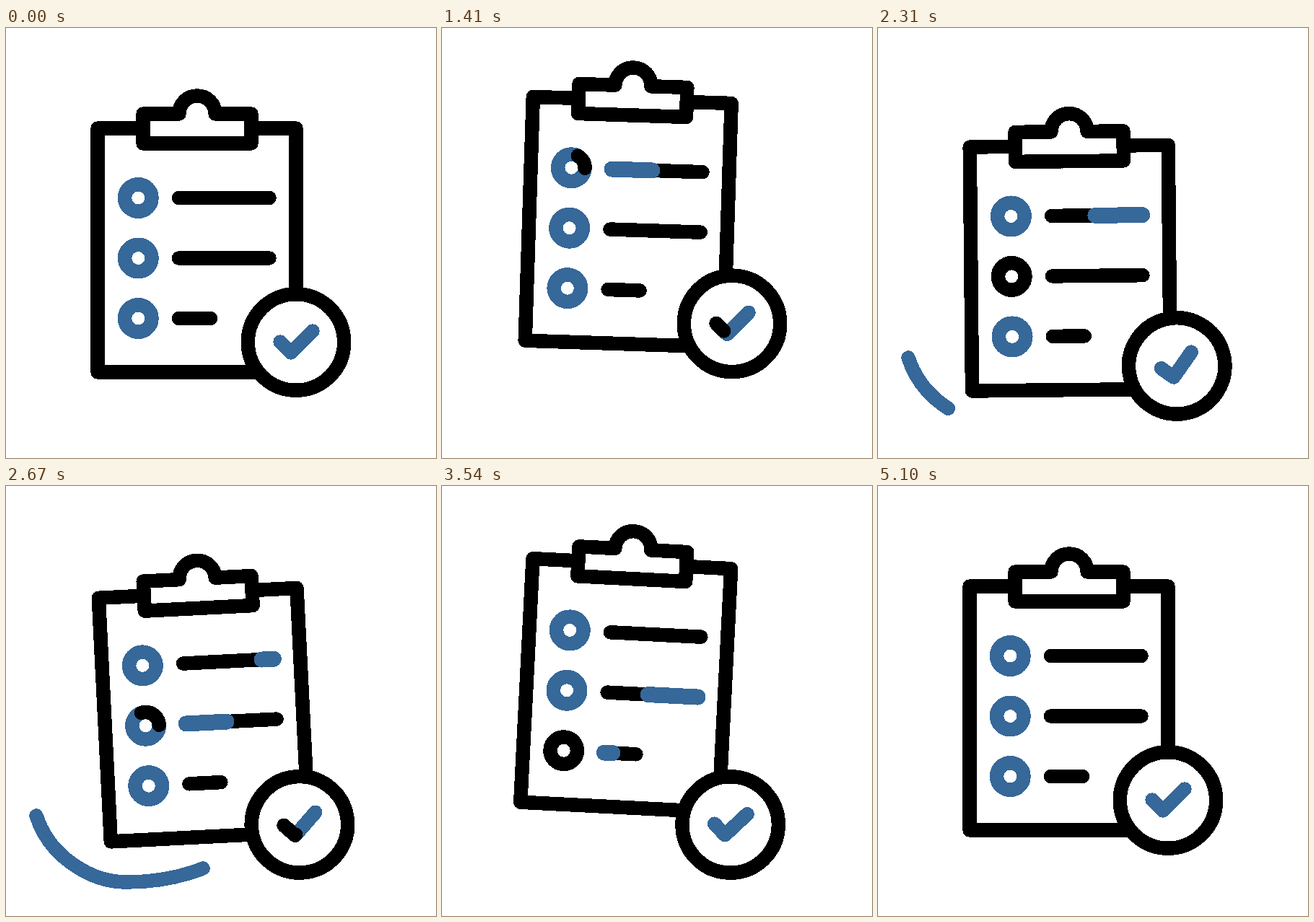
Animation of 596x596 px, one loop 5.4 s. Source, as an HTML page:

```html
<!DOCTYPE html>
<html lang="en">
<head>
<meta charset="utf-8">
<title>Checklist</title>
<style>
  html, body { margin: 0; width: 100%; height: 100%; overflow: hidden; background: #fff; }
  svg { display: block; width: 100vw; height: 100vh; shape-rendering: crispEdges; }
  path, circle { fill: none; stroke: #000; stroke-width: 19.5; stroke-linecap: round; stroke-linejoin: round; }
  .blue { stroke: #366899; }
  .wide { stroke-width: 22; }
  .solid { fill: #fff; }
</style>
</head>
<body>
<svg viewBox="0 0 596 596">
  <g id="swoosh"></g>
  <g id="board">
    <path class="solid" d="M127 139H402V477H127Z"/>
    <path class="solid" d="M190 119H240C240 105 251 94 265 94S290 105 290 119H340V160H190Z"/>
    <g id="rows"></g>
  </g>
  <g id="rays"></g>
  <g id="badge">
    <circle class="solid" cx="402" cy="435.5" r="66.7"/>
    <path class="blue" d="M380 435L395 450L425 420"/>
  </g>
</svg>
<script>
const LOOP = 5400, STEP = 30;
const $ = id => document.getElementById(id);
const clamp = x => Math.min(1, Math.max(0, x));
const ease = x => x * x * (3 - 2 * x);

// Eased value through [time, value] keys
function track(keys, t) {
  if (t <= keys[0][0]) return keys[0][1];
  for (let i = 1; i < keys.length; i++) {
    const [t0, v0] = keys[i - 1], [t1, v1] = keys[i];
    if (t < t1) return v0 + (v1 - v0) * ease((t - t0) / (t1 - t0));
  }
  return keys[keys.length - 1][1];
}

function addPath(parent, d, style = "") {
  const p = document.createElementNS("http://www.w3.org/2000/svg", "path");
  p.setAttribute("d", d);
  p.setAttribute("pathLength", 1);
  p.setAttribute("class", style);
  parent.appendChild(p);
  return p;
}

// Strokes that draw on from start to full, then wipe off until end
const strokes = [];
function addStroke(parent, d, style, start, full, end) {
  strokes.push({ el: addPath(parent, d, style), start, full, end });
}

const rows = [
  { y: 235.5, x: 365, ring: 990, line: 1050, wipe: 1860, done: 2790 },
  { y: 319, x: 365, ring: 2310, line: 2310, wipe: 3120, done: 4050 },
  { y: 402.5, x: 283.5, ring: 3540, line: 3330, wipe: 4140, done: 5080 }
];
for (const r of rows) {
  const ring = `M202 ${r.y}a18.75 18.75 0 1 1-37.5 0a18.75 18.75 0 1 1 37.5 0`;
  const line = `M239.5 ${r.y}H${r.x}`;
  addPath($("rows"), ring, "blue");
  addStroke($("rows"), ring, "", r.ring - 510, r.ring, r.ring + 510);
  addPath($("rows"), line);
  addStroke($("rows"), line, "blue wide", r.line, r.wipe, r.done);
}

for (const full of [1800, 3000, 4050])
  addStroke($("badge"), "M380 435L395 450L425 420", "", full - 510, full, full + 510);

addStroke($("swoosh"),
  "M42 457C52 488 72 511 97 527C118 541 142 549 167 549C203 549 240 543 273 530",
  "blue", 2130, 2670, 3210);

for (const a of [0, Math.PI / 4, Math.PI / 2]) {
  const at = r => `${402 + r * Math.cos(a)} ${435.5 + r * Math.sin(a)}`;
  addStroke($("rays"), `M${at(104)}L${at(134)}`, "blue", 4080, 4470, 4920);
}

const bob = [[535, 0], [1500, -40], [2385, 26], [3255, -40], [4200, 0]];
const tilt = [[840, 0], [1800, 2.95], [2700, -2.9], [3600, 3], [4500, 0]];
const lift = [[390, 0], [1050, -73], [1830, 34], [3960, 34], [4570, 0]];
const swing = [[1380, 0], [2340, -10], [3200, 8.2], [4060, -10], [4860, 0]];

function render(t) {
  $("board").setAttribute("transform",
    `translate(0 ${track(bob, t)}) rotate(${track(tilt, t)} 265 116)`);
  $("badge").setAttribute("transform",
    `translate(0 ${track(lift, t)}) rotate(${track(swing, t)} 402 365)`);
  for (const { el, start, full, end } of strokes) {
    const head = clamp((t - start) / (full - start));
    const tail = clamp((t - full) / (end - full));
    el.style.visibility = head > tail ? "visible" : "hidden";
    el.style.strokeDasharray = `${head - tail} 2`;
    el.style.strokeDashoffset = -tail;
  }
}

const origin = performance.now();
function tick() {
  const t = (performance.now() - origin) % LOOP;
  render(Math.floor(t / STEP) * STEP);
  requestAnimationFrame(tick);
}
tick();
</script>
</body>
</html>
```
